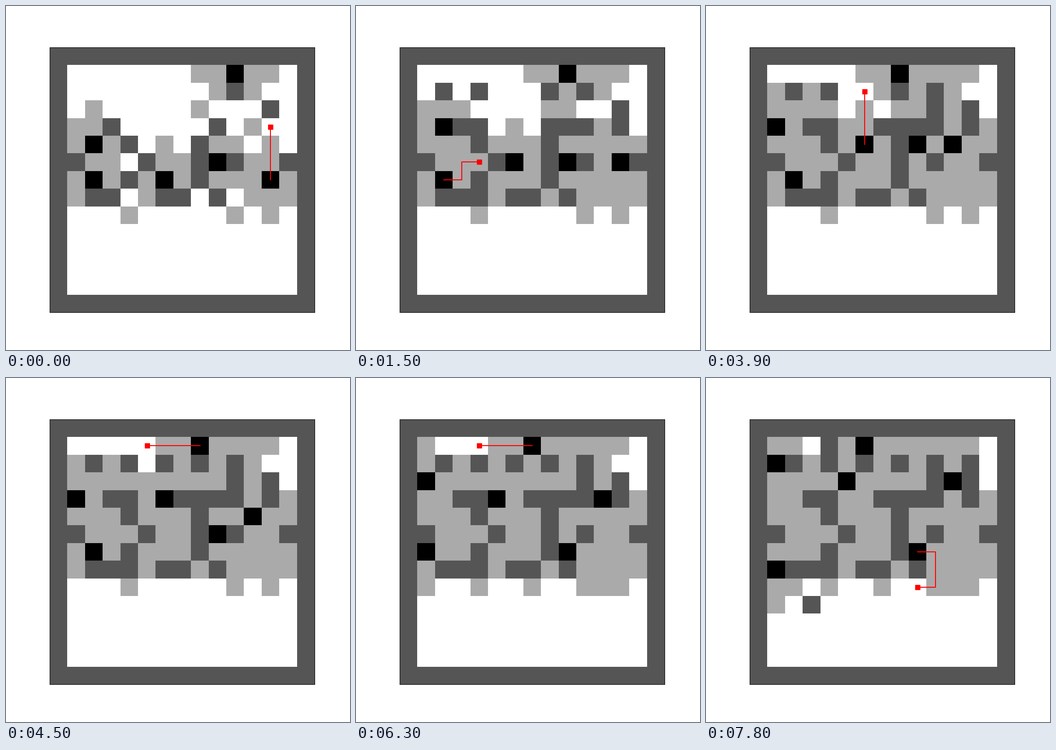
Write a matplotlib script that moves like this. It is 748 by 748 pixels and loops after 8000 ms.

```python
import numpy as np
import matplotlib.pyplot as plt
from matplotlib.animation import FuncAnimation

STAGE, DPI = 748, 100
TICK_MS, TICKS, TICKS_PER_TURN = 100, 80, 3
ROBOT, WALL, FREE, UNKNOWN = range(4)
SENSOR_RANGE = 2

MAZE = """
###############
#...#.........#
#.#.#.#.#.#.#.#
#.........#.#.#
#..##..####.#.#
#...#...#.....#
##...#..#.#..##
#...#...#.....#
#.###.##.#....#
#.............#
#..#..........#
#.............#
#.............#
#.............#
###############
""".split()
IS_WALL = np.array([[c == "#" for c in row] for row in MAZE])

# Robots (row, column) take turns in this order.
STARTS = [(7, 12), (7, 6), (6, 9), (1, 10), (5, 2), (7, 2)]

# Planned route on each turn; only its first move is carried out.
# An empty route means the goal turned out to be a wall.
ROUTES = [
    "UUU", "UUL", "", "LLL", "UUL", "RUR",
    "URU", "UUU", "URRUU", "LLL", "LUU", "LLDD",
    "LUU", "UUU", "DDRRURURUUULLD", "LLL", "UUU", "LDD",
    "UUUR", "LUU", "DRDDL", "LLL", "UUR", "DDR",
    "UUR", "ULLUU", "RDDL",
]
MOVES = {"U": (-1, 0), "D": (1, 0), "L": (0, -1), "R": (0, 1)}


def sense(known, cell):
    """Look along eight rays until a wall stops the view."""
    for dr in (-1, 0, 1):
        for dc in (-1, 0, 1):
            for reach in range(SENSOR_RANGE + 1):
                seen = cell[0] + dr * reach, cell[1] + dc * reach
                known[seen] = True
                if IS_WALL[seen]:
                    break


def trace(start, route):
    cells = [start]
    for move in route:
        dr, dc = MOVES[move]
        row, col = cells[-1]
        cells.append((row + dr, col + dc))
    return cells


def explore():
    """Return the picture and the planned path for every turn."""
    robots = list(STARTS)
    known = np.zeros(IS_WALL.shape, bool)
    known[[0, -1], :] = known[:, [0, -1]] = True
    for cell in robots:
        sense(known, cell)

    turns = []
    for turn, route in enumerate(ROUTES):
        active = turn % len(robots)
        picture = np.where(known, np.where(IS_WALL, WALL, FREE), UNKNOWN)
        for cell in robots:
            picture[cell] = ROBOT
        path = trace(robots[active], route) if route else []
        turns.append((picture, path))
        if path:
            robots[active] = path[1]
            sense(known, path[1])
    return turns


turns = explore()

fig, ax = plt.subplots(figsize=(STAGE / DPI, STAGE / DPI), dpi=DPI)
ax.set_xticks([])
ax.set_yticks([])
image = ax.imshow(turns[0][0], cmap="gray", vmin=ROBOT, vmax=UNKNOWN,
                  interpolation="nearest")
route_line, = ax.plot([], [], color="red", linewidth=1.5)
goal_mark, = ax.plot([], [], "s", color="red", markersize=7)


def update(tick):
    turn = min(tick // TICKS_PER_TURN, len(turns) - 1)
    picture, path = turns[turn]
    image.set_data(picture)
    rows = [row for row, _ in path]
    cols = [col for _, col in path]
    route_line.set_data(cols, rows)
    goal_mark.set_data(cols[-1:], rows[-1:])
    return image, route_line, goal_mark


animation = FuncAnimation(fig, update, frames=TICKS, interval=TICK_MS,
                          repeat=True, repeat_delay=0)
plt.show()
```
